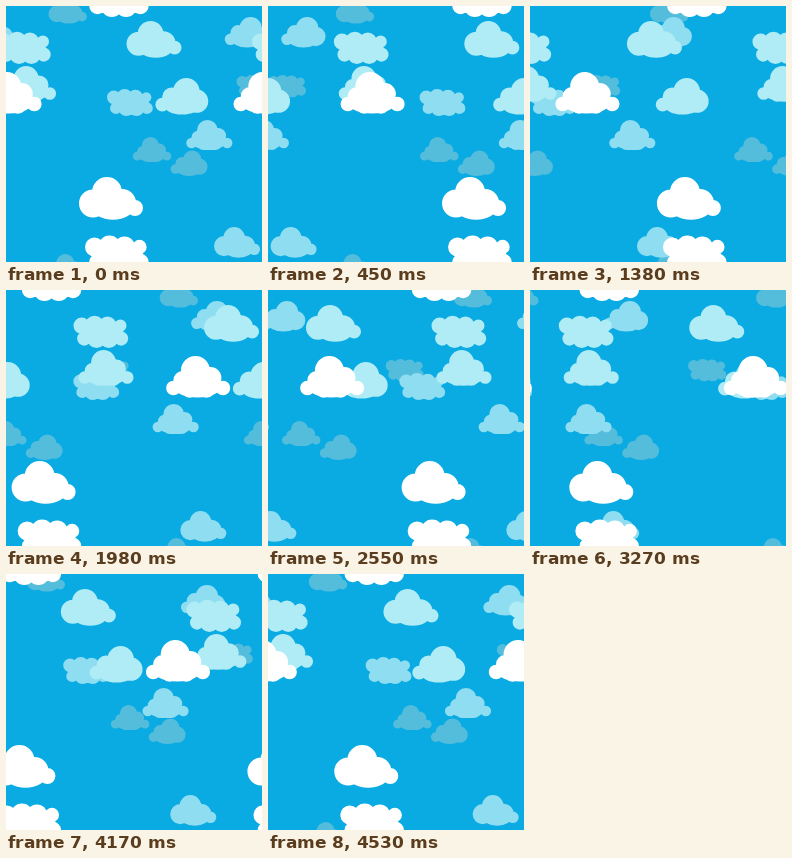
An HTML page with a canvas that plays this animation: 256x256 px, repeating every 4.56 s.

```html
<!DOCTYPE html>
<html lang="en">
<head>
<meta charset="utf-8">
<title>Drifting clouds</title>
<style>
  html, body { margin: 0; width: 100%; height: 100%; overflow: hidden; background: #0aaae3; }
  canvas { display: block; width: 256px; height: 256px; }
</style>
</head>
<body>
<canvas id="sky" width="256" height="256"></canvas>
<script>
const SIZE = 256, LOOP = 4560, STEP = 30;
const ctx = document.getElementById('sky').getContext('2d');

const puff = (x, y, rx, ry = rx) => ({ x, y, rx, ry });

// Four puffs side by side, largest near index `peak`.
const row = (x, y, gap, radius, peak) =>
  Array.from({ length: 4 }, (_, i) => puff(x + i * gap, y, radius * Math.cos((i - peak) / 2)));

// Clouds are drawn in a space 64 units wide; each has a body and its puffs.
const shapes = {
  round: [puff(34, 30, 21, 12.7), puff(14, 26.5, 14), puff(28, 15, 15), puff(43, 26, 14), puff(56, 31, 8)],
  leaning: [puff(32, 30, 22, 12.5), puff(9, 31, 8), puff(20, 22, 11), puff(37, 15.5, 15.5), puff(49, 27, 13.5)],
  peaked: [puff(31, 30, 24, 11.5), puff(16, 24, 9), puff(29, 14.5, 14.5), puff(44, 22, 11),
           ...row(7, 32, 16.5, 10, 1.5)],
  bumpy: [puff(34, 20, 24, 13), ...row(9.5, 13, 15, 11.5, 1.2), ...row(12.5, 28, 14.3, 11.3, 1.5)]
};

// Back to front: every layer is larger and crosses the sky once more per loop.
const layers = [
  { color: '#55bddc', scale: 0.6, clouds: {
    round: [42.5, 248], bumpy: [230.5, 68], peaked: [127, 131], leaning: [164, 144.5] } },
  { color: '#8fddf0', scale: 0.72, clouds: {
    leaning: [218, 11], bumpy: [101, 82], peaked: [180.5, 114], round: [208, 221] } },
  { color: '#afecf6', scale: 0.86, clouds: {
    round: [120.5, 15], leaning: [148.5, 72], peaked: [251.2, 60], bumpy: [246, 24.5] } },
  { color: '#ffffff', scale: 1, clouds: {
    round: [73, 171], bumpy: [79, 228], peaked: [227.8, 66] } }
];

function drawCloud(puffs, left, top, scale) {
  ctx.beginPath();
  for (const { x, y, rx, ry } of puffs) {
    const cx = left + x * scale, cy = top + y * scale;
    ctx.moveTo(cx + rx * scale, cy);
    ctx.ellipse(cx, cy, rx * scale, ry * scale, 0, 0, Math.PI * 2);
  }
  ctx.fill();
}

function draw(time) {
  const progress = Math.floor((time % LOOP) / STEP) * STEP / LOOP;
  ctx.fillStyle = '#0aaae3';
  ctx.fillRect(0, 0, SIZE, SIZE);
  layers.forEach(({ color, scale, clouds }, depth) => {
    ctx.fillStyle = color;
    for (const [shape, [x, y]] of Object.entries(clouds)) {
      const left = (x + progress * (depth + 1) * SIZE) % SIZE;
      for (const dx of [0, -SIZE])
        for (const dy of [0, -SIZE])
          drawCloud(shapes[shape], left + dx, y + dy, scale);
    }
  });
}

function frame() {
  draw(performance.now());
  requestAnimationFrame(frame);
}
frame();
</script>
</body>
</html>
```
